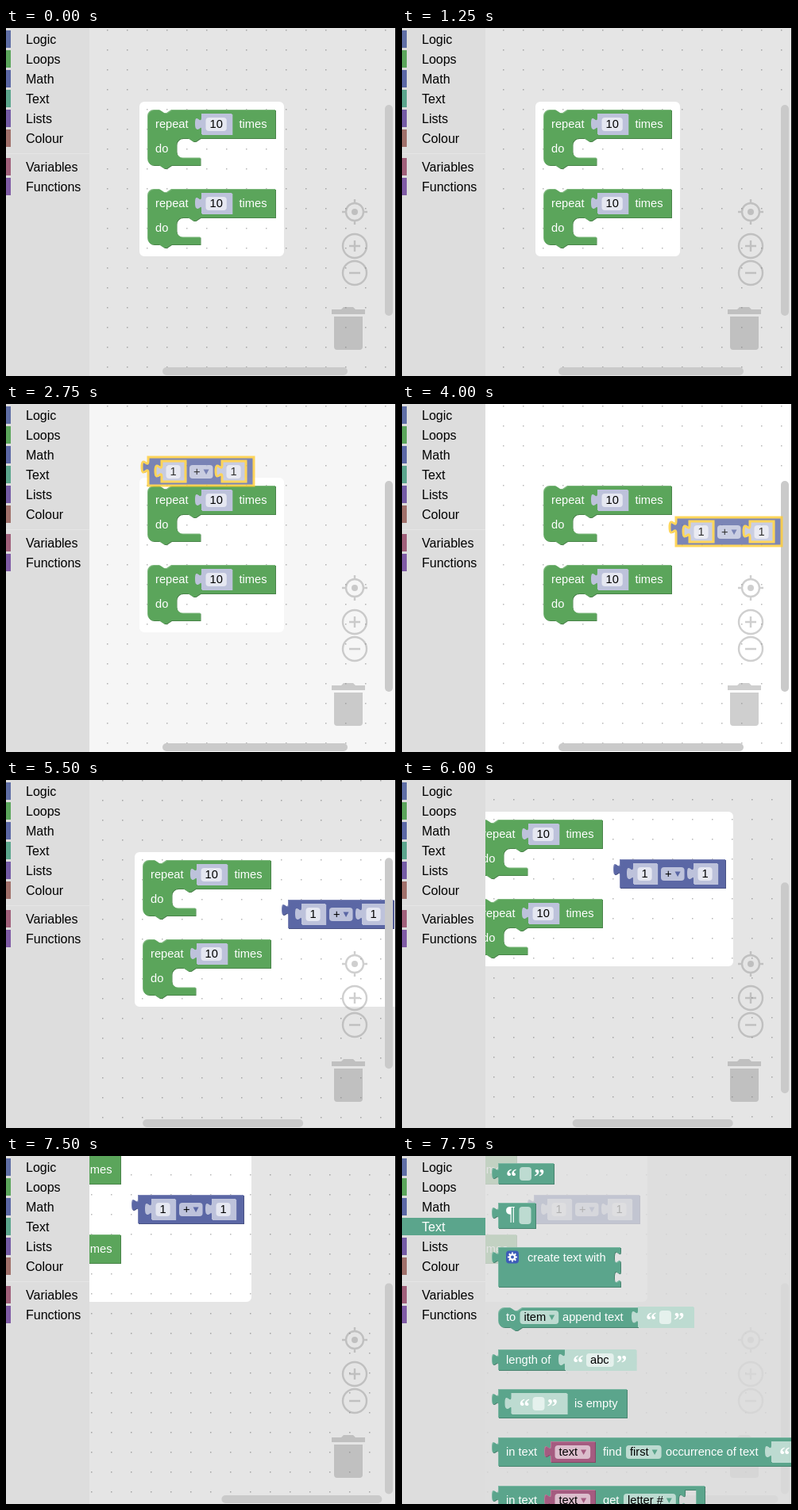
Write an HTML page with a canvas that moves like this. It is 491 px wide and 439 px high and loops after 8000 ms.

```html
<!DOCTYPE html>
<html lang="en">
<head>
<meta charset="utf-8">
<title>Block workspace</title>
<style>
html, body { margin: 0; width: 491px; height: 439px; overflow: hidden; background: #fff; }
canvas { display: block; }
</style>
</head>
<body>
<canvas id="stage" width="491" height="439"></canvas>
<script>
const W = 491, H = 439, LOOP = 8000, STEP = 250;
const stage = document.getElementById('stage').getContext('2d');
const layerCanvas = Object.assign(document.createElement('canvas'), { width: W, height: H });
const layer = layerCanvas.getContext('2d');
let g = stage;

const SANS = '"Liberation Sans", Arial, sans-serif';
const SERIF = '"Liberation Serif", Times, serif';
const FONT = '14.67px ' + SANS;
const GREEN = '#5ba55b', BLUE = '#5b67a5', TEAL = '#5ba58c', PINK = '#a55b80';
const SOLID = [GREEN, BLUE, TEAL, PINK];

const mix = (hex, to, f) => '#' + [1, 3, 5].map(i => {
  const v = parseInt(hex.slice(i, i + 2), 16);
  return Math.round(v + (to - v) * f).toString(16).padStart(2, '0');
}).join('');
const pale = c => mix(c, 255, 0.6);

function textWidth(s) {
  stage.font = FONT;
  return stage.measureText(s).width;
}

function write(s, x, y, color, font = FONT) {
  g.font = font;
  g.fillStyle = color;
  g.fillText(s, x, y);
}

function box(x, y, w, h, r, color) {
  g.fillStyle = color;
  g.beginPath();
  g.roundRect(x, y, w, h, r);
  g.fill();
}

// ---- block outlines ----
const TAB_UP = 'c0,-10 -8,8 -8,-7.5s8,2.5 8,-7.5';
const TAB_DOWN = 'c0,10 -8,-8 -8,7.5s8,-2.5 8,7.5';
const NOTCH_R = 'l6,4 3,0 6,-4', NOTCH_L = 'l-6,4 -3,0 -6,-4';
const TOP_LEFT = `M0,8a8,8 0 0,1 8,-8H15${NOTCH_R}`;
const BOTTOM_LEFT = `H30${NOTCH_L}H8a8,8 0 0,1 -8,-8z`;

const hole = (x, w) => `M${x},5h${w}v26h${-w}V25${TAB_UP}z`;

function make(c, w, h, parts, { holes = '', sockets = [], d, cy = h / 2 } = {}) {
  const right = sockets.map(y => `V${y + 5}${TAB_DOWN}`).join('');
  d = d || `M0,0H${w}${right}V${h}H0V20${TAB_UP}z`;
  return { c, w, cy, parts, path: new Path2D(d + holes) };
}

// ---- block parts: each draws at block left X, row centre cy, block colour c ----
const label = (x, s) => (X, cy) => write(s, X + x, cy + 5, '#fff');

const field = (x, s, arrow, minW = 0) => (X, cy, c) => {
  const tw = textWidth(s), left = X + x;
  const w = Math.max(minW, tw + (arrow ? 21 : 10));
  box(left, cy - 8, w, 17, 4, 'rgba(255,255,255,.6)');
  write(s, left + 5, cy + 5, '#000');
  if (!arrow) return;
  const ax = left + tw + 9;
  g.fillStyle = c;
  g.beginPath();
  g.moveTo(ax, cy - 2.5);
  g.lineTo(ax + 7, cy - 2.5);
  g.lineTo(ax + 3.5, cy + 4);
  g.fill();
};

const quote = (x, s) => (X, cy) => write(s, X + x, cy + 13, '#fff', 'bold 27px ' + SERIF);
const child = (x, b) => (X, cy) => drawBlock(b, X + x, cy - b.cy);

const number = s => make(pale(BLUE), textWidth(s) + 22, 26, [field(5.5, s)]);

function textValue(c, s) {
  const fw = s ? textWidth(s) + 11 : 15;
  return make(c, fw + 55, 26, [quote(10, '“'), field(27, s, false, fw), quote(fw + 30, '”')]);
}

function gear(X, cy) {
  const cx = X + 18, y = cy - 0.5;
  box(cx - 8, y - 8, 16, 16, 4, '#3d5cb8');
  g.fillStyle = g.strokeStyle = '#fff';
  g.lineWidth = 2;
  g.beginPath();
  for (let i = 0; i < 4; i++) {
    const a = i * Math.PI / 4, dx = 6 * Math.cos(a), dy = 6 * Math.sin(a);
    g.moveTo(cx - dx, y - dy);
    g.lineTo(cx + dx, y + dy);
  }
  g.stroke();
  g.beginPath();
  g.arc(cx, y, 4.3, 0, 7);
  g.fill();
  g.fillStyle = '#3d5cb8';
  g.beginPath();
  g.arc(cx, y, 2, 0, 7);
  g.fill();
}

function pilcrow(X, cy) {
  write('¶', X + 10, cy + 6, '#fff', '25px ' + SERIF);
  box(X + 26.5, cy - 11, 15, 22, 4, 'rgba(255,255,255,.6)');
}

// Solid blocks get a dark lower edge and a light upper one; pale blocks are flat.
function drawBlock(b, x, y, selected) {
  const solid = SOLID.includes(b.c);
  const fill = (shift, color) => {
    g.save();
    g.translate(x + shift, y + shift);
    g.fillStyle = color;
    g.fill(b.path, 'evenodd');
    g.restore();
  };
  fill(1, solid ? mix(b.c, 0, 0.2) : b.c);
  fill(0, solid && !selected ? mix(b.c, 255, 0.2) : b.c);
  if (solid && !selected) {
    g.save();
    g.translate(x, y);
    g.clip(b.path, 'evenodd');
    g.translate(-x, -y);
    fill(1, b.c);
    g.restore();
  }
  b.parts.forEach(p => p(x, y + b.cy, b.c));
  if (selected) {
    g.save();
    g.translate(x, y);
    g.strokeStyle = '#fc3';
    g.lineWidth = 3;
    g.stroke(b.path);
    g.restore();
  }
}

// ---- the blocks ----
const repeat = make(GREEN, 161, 70, [
  label(10, 'repeat'), child(68, number('10')), label(115.5, 'times'),
  (X, cy) => write('do', X + 10, cy + 36, '#fff')
], {
  cy: 18,
  d: `${TOP_LEFT}H161V36H66.5${NOTCH_L}h-7a8,8 0 0,0 -8,8v8.5a8,8 0 0,0 8,8H66.5V70${BOTTOM_LEFT}`
});

const sum = make(BLUE, 133, 36, [
  child(17, number('1')), field(52, '+', true), child(93, number('1'))
], { holes: hole(17, 30) + hole(93, 30) });

const withInput = (name, w, value) => make(BLUE, w, 26,
  [field(5.5, name, true), child(w, number(value))], { sockets: [0] });

const mathMenu = [
  [9, make(BLUE, 46.5, 26, [field(5.5, '123')])],
  [67, sum],
  [128, withInput('square root', 114, '9')],
  [178, withInput('sin', 58.5, '45')],
  [228, make(BLUE, 42, 26, [field(5.5, 'π', true)])],
  [278, make(BLUE, 131, 36, [child(16, number('0')), label(56, 'is'), field(71.5, 'even', true)],
    { holes: hole(16, 30) })],
  [339, withInput('round', 76.5, '3.1')],
  [389, make(BLUE, 112, 26, [field(5.5, 'sum', true), label(59, 'of list')], { sockets: [0] })]
];

const blank = textValue(pale(TEAL), '');
const variable = make(PINK, 56, 26, [field(5.5, 'text', true)]);

const textMenu = [
  [9, textValue(TEAL, '')],
  [59, make(TEAL, 47, 32, [pilcrow])],
  [115, make(TEAL, 154, 50, [gear, label(37, 'create text with')], { sockets: [0, 25], cy: 13 })],
  [191, make(TEAL, 176, 25,
    [label(10, 'to'), field(27.5, 'item', true), label(81, 'append text'), child(176, blank)],
    { d: `${TOP_LEFT}H176V5${TAB_DOWN}V25${BOTTOM_LEFT}`, cy: 12 })],
  [244, make(TEAL, 84, 26, [label(10, 'length of'), child(84, textValue(pale(TEAL), 'abc'))],
    { sockets: [0] })],
  [294, make(TEAL, 162, 36, [child(16.5, blank), label(96, 'is empty')], { holes: hole(16.5, 70) })],
  [355, make(TEAL, 425, 36, [
    label(10, 'in text'), child(66, variable), label(132, 'find'), field(161, 'first', true),
    label(211, 'occurrence of text'), child(344, blank)
  ], { holes: hole(66, 56) + hole(344, 70) })],
  [416, make(TEAL, 260, 36, [
    label(10, 'in text'), child(66, variable), label(132, 'get'), field(158, 'letter #', true)
  ], { holes: hole(66, 56) + hole(235, 14) })]
];

// ---- motion ----
const DRAG = [[2750, 179, 67], [3250, 308, 112], [3500, 327, 128], [3750, 343, 140], [4000, 345, 143], [4250, 347, 147]];
const PAN = [[5250, 0, 0], [5500, -6, -2], [6500, -168, -104], [7000, -195, -104]];

function along(keys, t) {
  if (t <= keys[0][0]) return keys[0].slice(1);
  for (let i = 1; i < keys.length; i++) {
    const a = keys[i - 1], b = keys[i];
    if (t <= b[0]) {
      const f = (t - a[0]) / (b[0] - a[0]);
      return [1, 2].map(k => Math.round(a[k] + (b[k] - a[k]) * f));
    }
  }
  return keys[keys.length - 1].slice(1);
}

function dimming(t) {
  if (t < 2750 || t >= 4750) return 1;
  return t === 2750 || t === 4500 ? 0.35 : 0;
}

// ---- scenery ----
function dots(px, py) {
  g.fillStyle = '#b8b8b8';
  const from = v => ((v % 25) + 25) % 25;
  for (let x = 100 + from(77 + px); x < 490; x += 25)
    for (let y = from(102 + py); y < H; y += 25) g.fillRect(x, y, 1.5, 1.5);
}

function icons() {
  const color = 'rgba(136,136,136,.4)';
  g.strokeStyle = g.fillStyle = color;
  g.lineWidth = 2.4;
  g.beginPath();
  const line = (x1, y1, x2, y2) => { g.moveTo(x1, y1); g.lineTo(x2, y2); };
  const ring = (y, r) => { g.moveTo(439 + r, y); g.arc(439, y, r, 0, 2 * Math.PI); };
  ring(232, 11);
  for (const s of [-1, 1]) {
    line(439 + s * 12.2, 232, 439 + s * 16, 232);
    line(439, 232 + s * 12.2, 439, 232 + s * 16);
  }
  ring(275, 15);
  line(432, 275, 446, 275);
  line(439, 268, 439, 273.8);
  line(439, 276.2, 439, 282);
  ring(309, 15);
  line(432, 309, 446, 309);
  g.stroke();
  g.beginPath();
  g.arc(439, 232, 4, 0, 7);
  g.fill();

  g.beginPath();
  g.moveTo(410, 361);
  g.lineTo(410, 355);
  g.lineTo(422, 355);
  g.lineTo(425, 352);
  g.lineTo(437, 352);
  g.lineTo(440, 355);
  g.lineTo(452, 355);
  g.lineTo(452, 361);
  g.roundRect(413, 364, 36, 42, [0, 0, 4, 4]);
  g.fill();
}

function flyout(width, menu, chosen) {
  box(105, 0, width, H, [0, 8, 8, 0], 'rgba(221,221,221,.8)');
  menu.forEach(([y, b]) => drawBlock(b, 121, y, b === chosen));
}

const ROWS = [
  ['Logic', '#5f6ea5'], ['Loops', GREEN], ['Math', BLUE], ['Text', TEAL], ['Lists', '#745ba5'],
  ['Colour', '#a0706a'], ['Variables', '#a0607a'], ['Functions', '#7f5ba5']
];

function sidebar(open) {
  g.fillStyle = '#ddd';
  g.fillRect(0, 0, 105, H);
  g.fillStyle = '#e5e5e5';
  g.fillRect(0, 158, 105, 1);
  ROWS.forEach(([name, color], i) => {
    const y = 3 + 25 * i + (i > 5 ? 11 : 0);
    g.fillStyle = color;
    g.fillRect(0, y, name === open ? 105 : 6, 22);
    write(name, 25, y + 17, name === open ? '#fff' : '#000', '16px ' + SANS);
  });
}

function draw(t) {
  const [px, py] = along(PAN, t);
  const dragging = t >= 2750 && t < 4500, dropped = t >= 4500;
  const open = t >= 7750 ? 'Text' : t >= 1500 && t < 2750 ? 'Math' : '';

  g = stage;
  g.fillStyle = '#fff';
  g.fillRect(0, 0, W, H);
  dots(px, py);

  g.fillStyle = `rgba(0,0,0,${0.1 * dimming(t)})`;
  g.beginPath();
  g.rect(105, 0, 386, H);
  g.roundRect(168 + px, 93 + py, dropped ? 336 : 182, 195, 6);
  g.fill('evenodd');

  drawBlock(repeat, 178 + px, 103 + py);
  drawBlock(repeat, 178 + px, 203 + py);
  if (dropped) drawBlock(sum, 361 + px, 153 + py, t < 5500);

  icons();
  box(dropped ? 169 - px * 0.525 : 197, 428, dropped ? 202 : 233, 10, 5, '#cacaca');
  box(477, 97 - py * 0.61, 10, 266, 5, '#cacaca');

  if (dragging) {
    g = layer;
    g.clearRect(0, 0, W, H);
    drawBlock(sum, ...along(DRAG, t), true);
    g = stage;
    g.globalAlpha = 0.8;
    g.drawImage(layerCanvas, 0, 0);
    g.globalAlpha = 1;
  }

  if (open === 'Math') {
    flyout(348, mathMenu, t >= 1750 ? sum : null);
    box(438, 2, 10, 266, 5, '#bdbdbd');
  } else if (open === 'Text') {
    flyout(400, textMenu);
  }

  sidebar(open);
  g.fillStyle = '#000';
  g.fillRect(490, 0, 1, H);
}

let start;
function tick(now) {
  if (start === undefined) start = now;
  const t = (now - start) % LOOP;
  draw(Math.floor(t / STEP) * STEP);
  requestAnimationFrame(tick);
}
draw(0);
requestAnimationFrame(tick);
</script>
</body>
</html>
```
